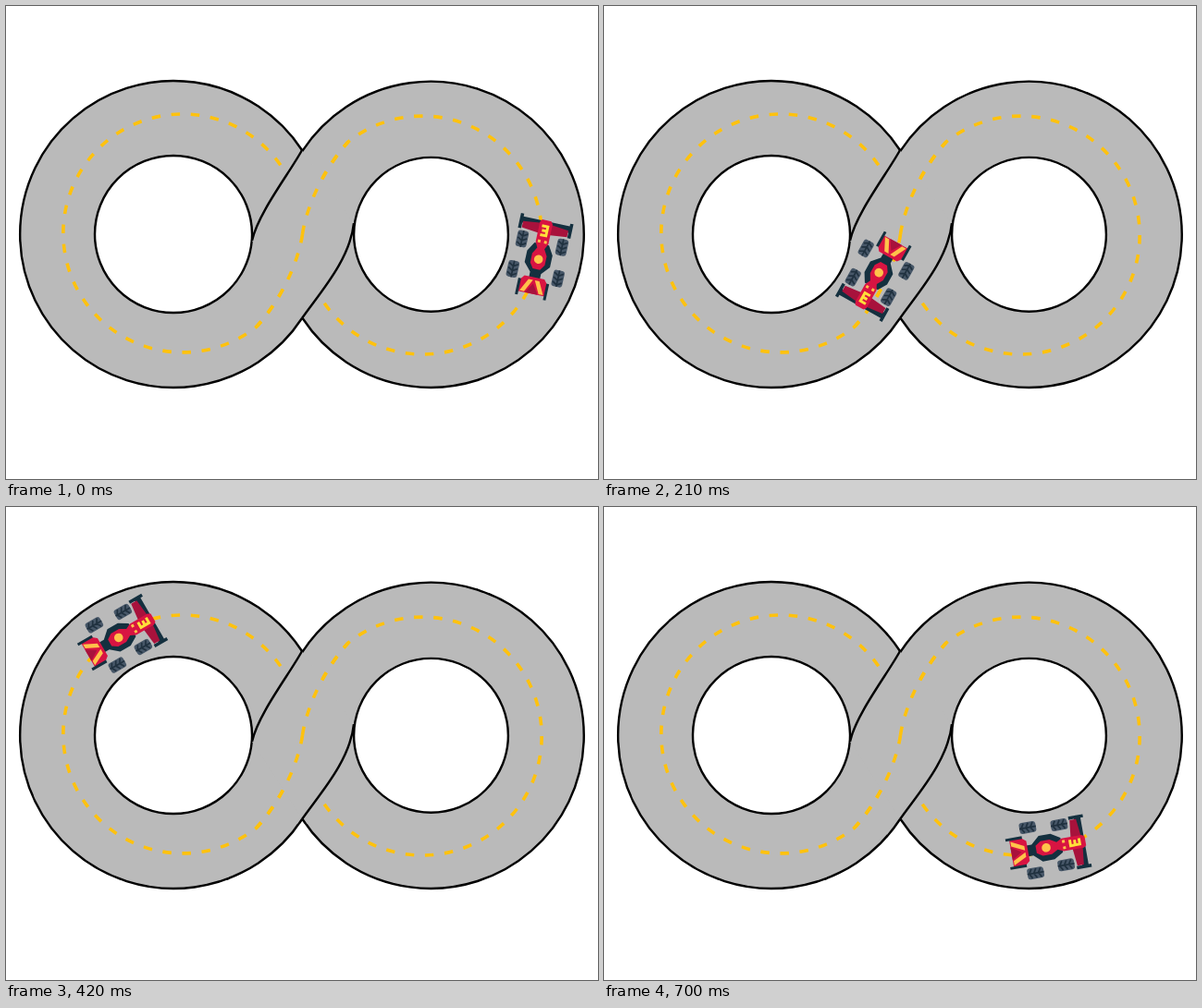
An HTML page for the animation above (0.77 s loop, 640 by 512 pixels).

```html
<!DOCTYPE html>
<html lang="en">
<head>
<meta charset="utf-8">
<title>Infinity track</title>
<style>
  html, body { margin: 0; width: 100%; height: 100%; overflow: hidden; background: #fff; }
  svg { display: block; width: 100vw; height: 100vh; }
  .road { fill: #bababa; }
  .edge { stroke: #000; stroke-width: 2.4; }
  .lane { fill: none; stroke: #ffc20e; stroke-width: 3.6; stroke-dasharray: 9.5 11.65; }
  .navy { fill: #14303f; }
  .red { fill: #d81442; }
  .wine { fill: #a8123c; }
  .gold { fill: #ffc24a; }
</style>
</head>
<body>
<svg id="stage" viewBox="0 0 640 512">
  <defs>
    <path id="route" d="M364 169L297 289A122 122 0 1 1 290 190C318 225 317 284 352 312A122 122 0 1 0 364 169"/>
    <path id="loopLane" class="lane" d="M320.5 247C324 222 340 180 370 147A129 129 0 1 1 340.1 315.4"/>
    <path id="bridgeLane" class="lane" d="M320.5 247C324 222 340 180 370 147"/>
    <g id="wheel">
      <rect x="-6" y="-9" width="12" height="18" rx="3" fill="#475768"/>
      <path d="M-5-6L0-3L5-6M-5-1L0 2L5-1M-5 4L0 7L5 4M0-9V9" fill="none" stroke="#20313f" stroke-width="1.7"/>
    </g>
  </defs>

  <path class="road edge" d="M320 156A166 166 0 1 0 320 338L320.6 338A165.6 165.6 0 1 0 320.6 156.6Z"/>
  <circle class="edge" cx="181" cy="247" r="85" fill="#fff"/>
  <circle class="edge" cx="459.5" cy="247.3" r="83.4" fill="#fff"/>
  <use href="#loopLane"/>
  <use href="#loopLane" transform="rotate(180 320.5 247)"/>

  <g id="bridge">
    <path class="road" d="M266 254C272 225 307 180 320 156L376 235C372 275 338 312 320 338Z"/>
    <path class="edge" fill="none" d="M266 254C272 225 307 180 320 156M376 235C372 275 338 312 320 338"/>
    <use href="#bridgeLane"/>
    <use href="#bridgeLane" transform="rotate(180 320.5 247)"/>
  </g>

  <g id="car">
    <use href="#wheel" x="-22" y="-18"/>
    <use href="#wheel" x="22" y="-18"/>
    <use href="#wheel" x="-25" y="16"/>
    <use href="#wheel" x="25" y="16"/>
    <path class="navy" d="M-29-45h3.5v3H25.5v-3H29v16H25.5v-6H-25.5v6H-29Z"/>
    <path class="wine" d="M-25-37L-7-39H7L25-37V-30L7-28H-7L-25-30Z"/>
    <path class="navy" d="M-8-17H8L14-7V6L6 15V24H-6V15L-14 6V-7Z"/>
    <path class="red" d="M-5-43H5L7-40V-18L4-12L8-5V5L4 11H-4L-8 5V-5L-4-12L-7-18V-40Z"/>
    <path class="gold" d="M-5-18h3v-3h-3ZM2-18h3v-3h-3Z"/>
    <path fill="#ffe03a" d="M-4-38H4V-25H-4V-28H1V-30H-3V-33H1V-35H-4Z"/>
    <circle class="gold" r="4.8"/>
    <path class="red" d="M-11 20H11L15 25V38H-15V25Z"/>
    <path class="wine" d="M0 27L7 38H-7Z"/>
    <path class="gold" d="M-6 23H-1L-8 37H-13ZM6 23H1L8 37H13Z"/>
    <path class="navy" d="M-17 24h3v18h-3ZM14 24h3v18h-3Z"/>
  </g>
</svg>
<script>
  const [stage, route, bridge, car] =
    ["stage", "route", "bridge", "car"].map(id => document.getElementById(id));
  const STEP = 70, STEPS = 11;
  const total = route.getTotalLength();
  // step: distance along the route; the speed is even between keys
  const keys = Object.entries({ 0: -322, 2: 1, 5: 409, 7: 804, 9: 943, 11: total - 322 });

  function distanceAt(step) {
    const next = keys.findIndex(([at]) => at > step);
    const [[t0, d0], [t1, d1]] = keys.slice(next - 1, next + 1);
    return (d0 + (d1 - d0) * (step - t0) / (t1 - t0) + total) % total;
  }

  function draw(now) {
    const distance = distanceAt(Math.floor(now / STEP) % STEPS);
    const { x, y } = route.getPointAtLength(distance);
    const behind = route.getPointAtLength(distance - 1);
    const heading = Math.atan2(x - behind.x, behind.y - y) * 180 / Math.PI;
    const under = distance > 700 && distance < 1000;
    car.setAttribute("transform", `translate(${x} ${y}) rotate(${heading})`);
    stage.insertBefore(car, under ? bridge : null);
    requestAnimationFrame(draw);
  }
  draw(0);
</script>
</body>
</html>
```
